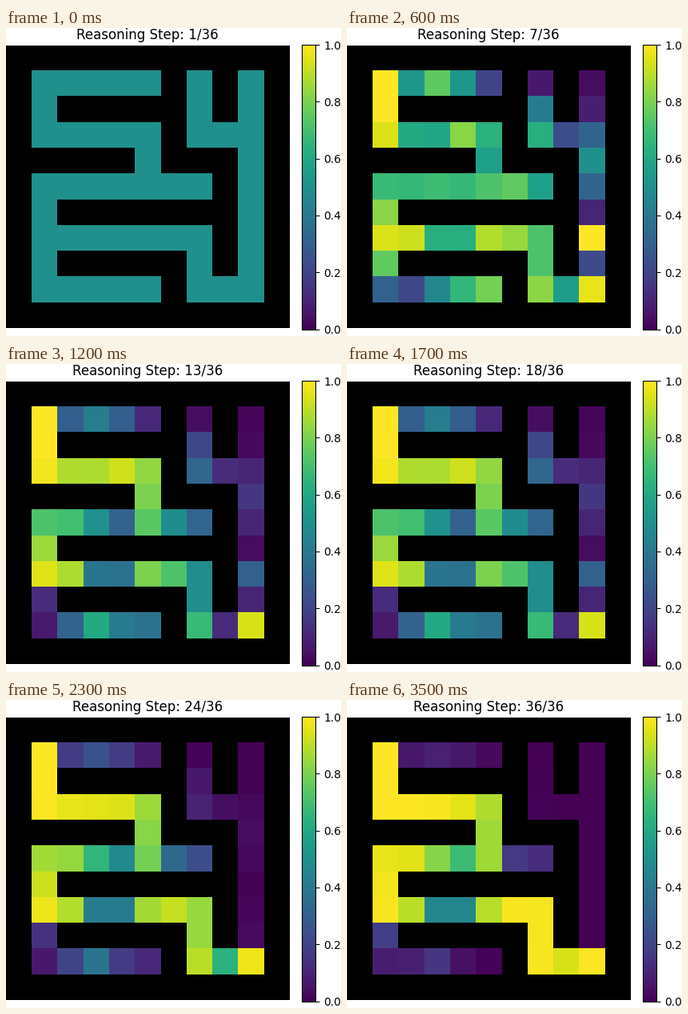
These frames come from a looping animation (419 px wide and 386 px high, 3.6 s). A matplotlib script:

```python
import numpy as np
import matplotlib.pyplot as plt
from matplotlib.animation import FuncAnimation

W, H, DPI = 419, 386, 100
STEPS, HOLD = 36, 6          # steps per loop, steps between value updates
SIZE = 11                    # maze cells per side


def walk(*corners):
    """All cells on the straight lines between corners."""
    cells = [corners[0]]
    for row, col in corners[1:]:
        while cells[-1] != (row, col):
            r, c = cells[-1]
            cells.append((r + np.sign(row - r), c + np.sign(col - c)))
    return cells


ROUTE = walk((1, 1), (3, 1), (3, 5), (5, 5), (5, 1), (7, 1),
             (7, 7), (9, 7), (9, 9))
DEAD_ENDS = (walk((1, 2), (1, 5)) + walk((5, 6), (5, 7))
             + walk((8, 1), (9, 1), (9, 5)) + walk((8, 9), (1, 9))
             + walk((3, 8), (3, 7), (1, 7)))

# Bumps along each list of cells:
# centre, width, height at first update, height at second, later growth rate
DOUBTS = [
    (3.5, 1.0, .50, .15, .30),
    (6.7, 1.5, .45, .20, .90),
    (9.2, 1.0, .25, .65, .78),
    (11.5, 1.8, .35, .30, .50),
    (16.5, 1.1, .45, .75, .96),
    (20.5, 1.8, .30, .55, .30),
    (23.0, 0.6, .40, .80, .42),
]
HOPES = [
    (1.0, 1.7, .75, .42, .60),
    (4.4, 0.7, 1.0, .65, .70),
    (6.2, 0.8, .80, .13, 1.15),
    (8.8, 1.0, .40, .60, .65),
    (10.7, 1.1, .85, .40, .30),
    (13.0, 0.5, 1.0, .30, .05),
    (16.0, 1.5, .50, .16, .20),
    (21.2, 1.2, .65, .34, .30),
]


def ripple(bumps, count, update_no):
    s = np.arange(count)
    total = np.zeros(count)
    for centre, width, first, second, rate in bumps:
        height = first if update_no == 1 else second * rate ** (update_no - 2)
        total += height * np.exp(-((s - centre) / width) ** 2)
    return np.clip(total, 0, 1)


def beliefs(update_no):
    """Maze of values: the route settles at 1, dead ends at 0, walls are masked."""
    maze = np.full((SIZE, SIZE), np.nan)
    if update_no == 0:
        route, dead = np.full(len(ROUTE), .5), np.full(len(DEAD_ENDS), .5)
    else:
        route = 1 - ripple(DOUBTS, len(ROUTE), update_no)
        dead = ripple(HOPES, len(DEAD_ENDS), update_no)
    maze[tuple(zip(*ROUTE))] = route
    maze[tuple(zip(*DEAD_ENDS))] = dead
    return np.ma.masked_invalid(maze)


STAGES = [beliefs(n) for n in range(STEPS // HOLD)]

plt.rcParams["font.family"] = "DejaVu Sans"
fig = plt.figure(figsize=(W / DPI, H / DPI), dpi=DPI, facecolor="white")


def pixel_axes(left, bottom, width, height):
    return fig.add_axes([left / W, bottom / H, width / W, height / H])


ax = pixel_axes(-0.1, 9.6, 354.18, 354.18)
cax = pixel_axes(369.6, 8.4, 17.8, 356.5)

cmap = plt.get_cmap("viridis").copy()
cmap.set_bad("black")
image = ax.imshow(STAGES[0], cmap=cmap, vmin=0, vmax=1,
                  interpolation="nearest")
ax.axis("off")
title = ax.set_title("", fontsize=12, pad=6, y=1.0)
fig.colorbar(image, cax=cax, ticks=np.linspace(0, 1, 6))


def update(i):
    image.set_data(STAGES[i // HOLD])
    title.set_text(f"Reasoning Step: {i + 1}/{STEPS}")
    return image, title


anim = FuncAnimation(fig, update, frames=STEPS, interval=100,
                     init_func=lambda: update(0), repeat=True, repeat_delay=0)
plt.show()
```
